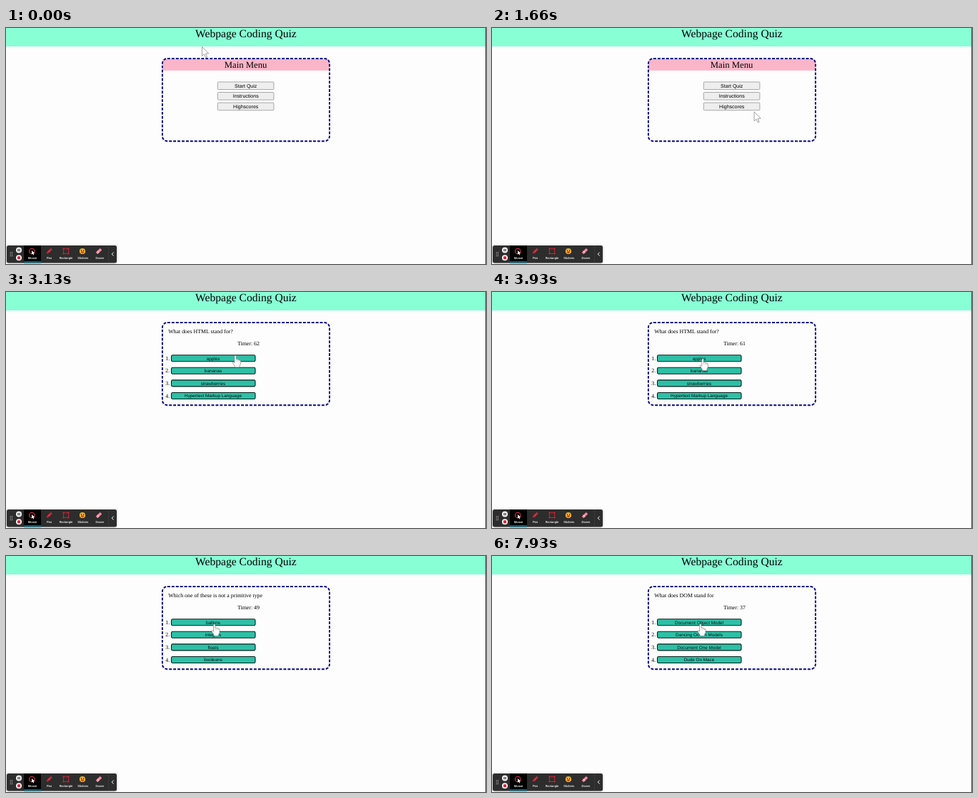
Animation of 672x332 px, one loop 8 s. Source, as an HTML page with a canvas:

```html
<!DOCTYPE html>
<html lang="en">
<head>
<meta charset="utf-8">
<title>Webpage Coding Quiz</title>
<style>
html, body { margin: 0; width: 100%; height: 100%; overflow: hidden; background: #fdfdfd; }
canvas { display: block; width: 672px; height: 332px; }
</style>
</head>
<body>
<canvas id="stage"></canvas>
<script>
const W = 672, H = 332, LOOP = 8000;
const canvas = document.getElementById('stage');
const ctx = canvas.getContext('2d');
const dpr = window.devicePixelRatio || 1;
canvas.width = W * dpr;
canvas.height = H * dpr;

const SERIF = '"Liberation Serif", serif';
const SANS = '"Liberation Sans", sans-serif';
const UI = 'Roboto, sans-serif';

const menu = ['Start Quiz', 'Instructions', 'Highscores'];
const quiz = [
  { at: 2530, ask: 'What does HTML stand for?',
    answers: ['apples', 'bananas', 'strawberries', 'Hypertext Markup Language'] },
  { at: 4200, ask: 'What does CSS stand for?',
    answers: ['Crab Station Stop', 'country side step', 'Cascading Style Sheets', 'pineapples'] },
  { at: 5330, ask: 'Which one of these is not a primitive type',
    answers: ['ballons', 'integers', 'floats', 'booleans'] },
  { at: 6730, ask: 'What does DOM stand for',
    answers: ['Document Object Model', 'Dancing Ocean Models', 'Document One Model', 'Dude On Mace'] }
];
const clicks = [[2330, 2530], [4060, 4200], [5200, 5330], [6600, 6730]];

// time, x, y of the pointer tip
const path = [
  [0, 274.5, 26.5], [930, 382.3, 153.8], [1250, 382.3, 153.8], [2060, 352.5, 83.5],
  [2600, 352.5, 83.5], [3600, 295, 93.5], [3930, 295, 93.5], [4600, 291.7, 95.5], [LOOP, 291.7, 95.5]
];

function pointer(t) {
  const i = Math.max(1, path.findIndex(p => p[0] >= t));
  const [t0, x0, y0] = path[i - 1], [t1, x1, y1] = path[i];
  const u = (t - t0) / (t1 - t0), k = u * u * (3 - 2 * u);
  return [x0 + (x1 - x0) * k, y0 + (y1 - y0) * k];
}

function rect(x, y, w, h, fill) {
  ctx.fillStyle = fill;
  ctx.fillRect(x, y, w, h);
}

function box(x, y, w, h, r, fill, stroke, line = 1) {
  ctx.beginPath();
  ctx.roundRect(x, y, w, h, r);
  if (fill) { ctx.fillStyle = fill; ctx.fill(); }
  if (stroke) { ctx.strokeStyle = stroke; ctx.lineWidth = line; ctx.stroke(); }
}

function disc(x, y, r, fill, stroke, line = 1) {
  ctx.beginPath();
  ctx.arc(x, y, r, 0, Math.PI * 2);
  if (fill) { ctx.fillStyle = fill; ctx.fill(); }
  if (stroke) { ctx.strokeStyle = stroke; ctx.lineWidth = line; ctx.stroke(); }
}

function poly(points, fill, stroke, line = 1, close = true) {
  ctx.beginPath();
  points.forEach(([x, y]) => ctx.lineTo(x, y));
  if (close) ctx.closePath();
  if (fill) { ctx.fillStyle = fill; ctx.fill(); }
  if (stroke) { ctx.strokeStyle = stroke; ctx.lineWidth = line; ctx.stroke(); }
}

function text(s, x, y, size, family, align = 'center', color = '#000', weight = 400) {
  ctx.font = `${weight} ${size}px ${family}`;
  ctx.textAlign = align;
  ctx.fillStyle = color;
  ctx.fillText(s, x, y);
}

function at(x, y, draw) {
  ctx.save();
  ctx.translate(x, y);
  draw();
  ctx.restore();
}

function frameBorder() {
  const x = 218.9, y = 43, w = 234, h = 116.2, r = 7;
  const length = 2 * (w + h) - 8 * r + 2 * Math.PI * r;
  const dash = 3.94, count = Math.round(length / 5.91);
  ctx.setLineDash([dash, length / count - dash]);
  box(x, y, w, h, r, null, '#000080', 1.9);
  ctx.setLineDash([]);
}

const menuTop = i => 75.9 + i * 14.6;
const answerTop = i => 88.7 + i * 17.6;

function overButton(x, y, playing) {
  return playing
    ? x > 231 && x < 349.5 && quiz[0].answers.some((a, i) => y > answerTop(i) && y < answerTop(i) + 9.5)
    : x > 296 && x < 375 && menu.some((m, i) => y > menuTop(i) && y < menuTop(i) + 10.7);
}

function drawMenu(pressed) {
  rect(219.5, 44, 233, 15.8, '#fbb5c8');
  text('Main Menu', 335.6, 56, 12.7, SERIF);
  menu.forEach((label, i) => {
    const active = pressed && i === 0, y = menuTop(i);
    box(296.3, y, 78.6, 10.6, 1, active ? '#f6f6f6' : '#eeeeee', active ? '#c4c4c4' : '#939393', 0.8);
    text(label, 335.7, y + 7.8, 7.05, SANS);
  });
}

function drawQuestion(q, seconds) {
  text(q.ask, 227.2, 58, 7.87, SERIF, 'left');
  text('Timer: ' + seconds, 339.5, 74.6, 7.87, SERIF);
  q.answers.forEach((label, i) => {
    const y = answerTop(i);
    text(i + 1 + '.', 229.2, y + 7, 7.87, SERIF, 'right');
    box(231.5, y, 117.5, 9, 1.8, '#2dc0a6', '#06201c', 1.1);
    text(label, 290, y + 6.8, 6.33, SANS, 'center', '#04110f');
  });
}

// one tick each second, ten more for each wrong answer
function timer(t) {
  const ticks = Math.floor((t - 2530) / 1000);
  const wrong = quiz.slice(2).filter(q => t >= q.at).length;
  return 62 - ticks - 10 * wrong;
}

function drawArrow(x, y) {
  at(x, y, () => poly([[0, 0], [0, 13], [3, 10.3], [5.2, 15], [7.1, 14.2], [5, 9.6], [9.2, 9.3]],
    '#fff', '#777', 0.7));
}

function drawHand(x, y) {
  at(x, y, () => {
    ctx.beginPath();
    ctx.moveTo(-1.2, 1.2);
    ctx.quadraticCurveTo(0, -0.8, 1.2, 1.2);
    ctx.lineTo(1.2, 5.6);
    ctx.quadraticCurveTo(2.5, 4.8, 3.6, 6.2);
    ctx.quadraticCurveTo(5, 5.5, 5.7, 7);
    ctx.quadraticCurveTo(7.4, 6.6, 7.5, 8.6);
    ctx.lineTo(7.3, 12.4);
    ctx.lineTo(5.9, 15);
    ctx.lineTo(5.9, 17);
    ctx.lineTo(-0.6, 17);
    ctx.lineTo(-0.8, 15);
    ctx.lineTo(-3.9, 10.4);
    ctx.quadraticCurveTo(-3.8, 8.4, -1.2, 10.6);
    ctx.closePath();
    ctx.fillStyle = '#fff';
    ctx.fill();
    ctx.strokeStyle = '#777';
    ctx.lineWidth = 0.65;
    ctx.stroke();
    for (const k of [1.2, 3.6, 5.7]) poly([[k, 6.4], [k, 9]], null, '#999', 0.5, false);
  });
}

function drawTools() {
  ctx.save();
  ctx.shadowColor = 'rgba(0,0,0,.35)';
  ctx.shadowBlur = 3 * dpr;
  box(1, 306, 154, 24.5, 2.5, '#2d2d2d');
  ctx.restore();

  for (let i = 0; i < 6; i++) rect(5.8 + (i % 2) * 2.2, 315.2 + (i >> 1) * 2.4, 1.1, 1.1, '#c8c8c8');
  disc(18, 312.5, 4, '#f4f4f4');
  rect(16.4, 310.8, 1.1, 3.4, '#222');
  rect(18.5, 310.8, 1.1, 3.4, '#222');
  disc(18, 323.3, 4, '#f4f4f4');
  box(16, 321.3, 4, 4, 0.8, '#e01f35');

  rect(25, 306, 24, 24.5, '#000');
  rect(25, 328.6, 24, 1.4, '#2391a8');
  disc(36.2, 314, 3.7, null, '#e8384c', 1.1);
  at(36, 313, () => poly([[0, 0], [0, 5.6], [1.5, 4.5], [2.4, 6.4], [3.4, 5.9], [2.5, 4.1], [4.2, 3.9]], '#fff'));

  at(60.5, 314, () => {
    ctx.rotate(Math.PI / 4);
    box(-1.4, -4.6, 2.8, 2.2, 0.6, '#f0283c');
    rect(-1.4, -2, 2.8, 4.2, '#f0283c');
    poly([[-1.4, 2.6], [1.4, 2.6], [0, 5]], '#f0283c');
  });

  box(80.4, 310.6, 7.2, 6.8, 0, null, '#d41f30', 1);
  for (const x of [80.4, 87.6]) for (const y of [310.6, 317.4]) rect(x - 0.8, y - 0.8, 1.6, 1.6, '#e52b3c');

  disc(107, 314, 4.1, '#f5b52b');
  disc(105.5, 312.9, 0.8, '#4a2a10');
  disc(108.6, 312.9, 0.8, '#4a2a10');
  ctx.beginPath();
  ctx.arc(107, 314.6, 2.2, 0, Math.PI);
  ctx.fillStyle = '#b5332c';
  ctx.fill();

  at(130, 314, () => {
    ctx.rotate(-Math.PI / 4);
    box(-4.3, -1.8, 8.6, 3.6, 0.7, '#f08a9c');
    rect(-1.7, -1.8, 0.8, 3.6, '#fbd9df');
  });

  const labels = { Mouse: 37, Pen: 60.5, Rectangle: 84, Stickers: 107.7, Eraser: 131.3 };
  for (const name in labels) text(name, labels[name], 324.7, 4.15, UI, 'center', '#f2f2f2', 500);
  rect(143, 306, 0.6, 24.5, '#444');
  poly([[150.6, 315.6], [148.2, 318.1], [150.6, 320.6]], null, '#fff', 1, false);
}

function draw(t) {
  ctx.setTransform(dpr, 0, 0, dpr, 0, 0);
  ctx.textRendering = 'geometricPrecision';
  rect(0, 0, W, H, '#fdfdfd');
  rect(0, 0, 671, 26, '#88ffd5');
  text('Webpage Coding Quiz', 335.9, 13.3, 15.6, SERIF);
  rect(671, 0, 1, H, '#5a5a5a');

  const question = quiz.filter(q => t >= q.at).pop();
  const pressed = clicks.some(([from, to]) => t >= from && t < to);
  if (question) drawQuestion(question, timer(t));
  else drawMenu(pressed);
  frameBorder();
  drawTools();

  const [x, y] = pointer(t);
  if (pressed) disc(x - 0.4, y + 0.3, 12.8, 'rgba(225,90,105,.06)', '#df6572', 1.4);
  (overButton(x, y, !!question) ? drawHand : drawArrow)(x, y);
}

const start = performance.now();
function loop() {
  draw((performance.now() - start) % LOOP);
  requestAnimationFrame(loop);
}
loop();
</script>
</body>
</html>
```
